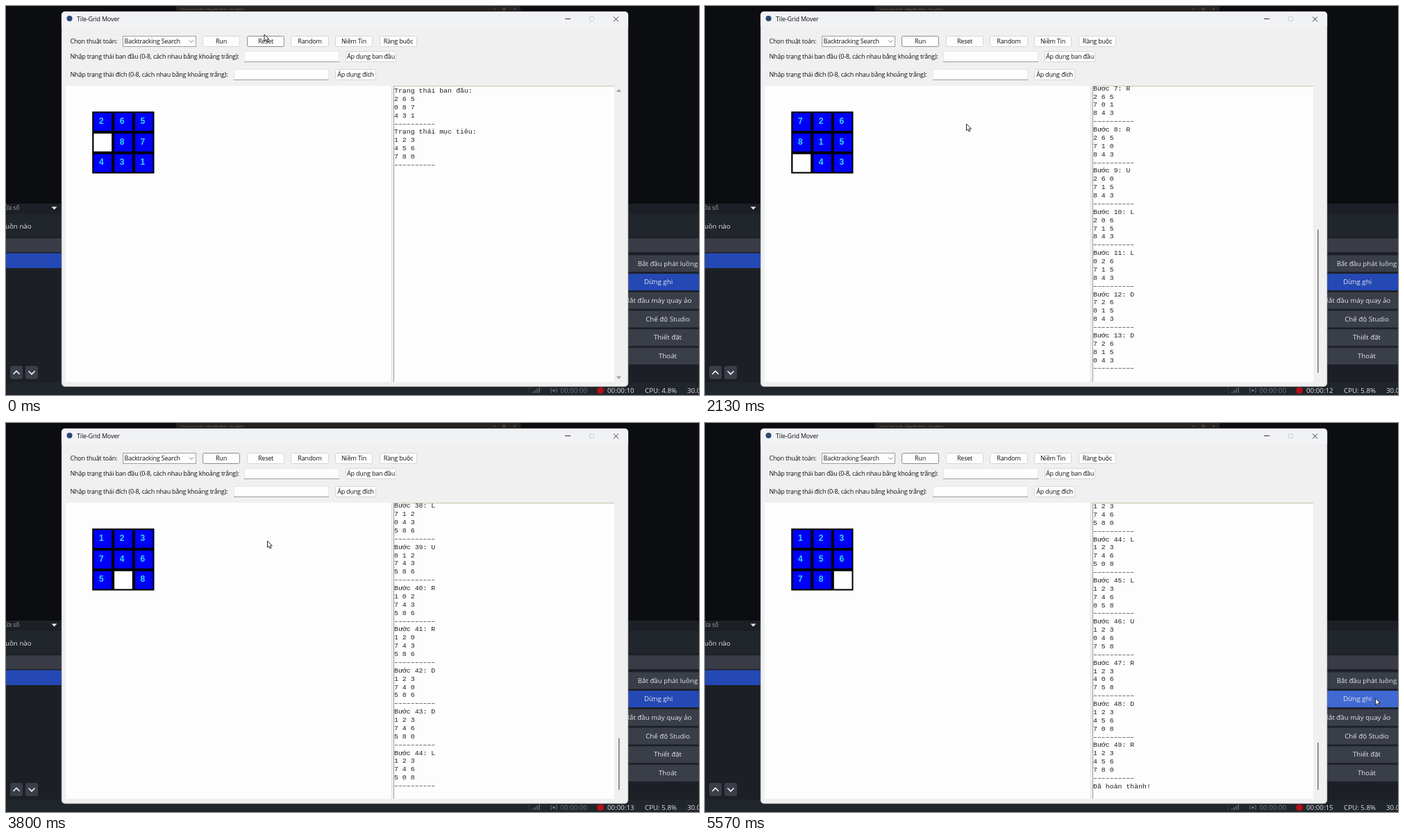
These frames come from a looping animation (998x561 px, 5.61 s). An HTML page:

```html
<!DOCTYPE html>
<html lang="vi">
<head>
<meta charset="utf-8">
<title>Sliding tiles</title>
<style>
  html, body { margin: 0; width: 100%; height: 100%; overflow: hidden; background: #0c0d10; }
  #stage { position: relative; width: 998px; height: 561px; overflow: hidden; }
  svg { position: absolute; left: 0; top: 0; }
  text { font-family: "Open Sans", "Noto Sans", sans-serif; }
  .ui text { font-size: 9px; letter-spacing: -.19px; fill: #111; }
  .dock text { font-size: 9.75px; fill: #e4e5e8; }
  .dock .dim { fill: #70747d; }
  .mid { text-anchor: middle; }
  .btn { fill: #fdfdfd; stroke: #d6d6d6; }
  .btn.focus { stroke: #8c8c96; }
  .btn.hover { fill: #deeffa; stroke: #2f86c8; }
  .key { fill: #3a3e49; }
  .key.main { fill: #2549b4; }
  .key.main.hover { fill: #4069d2; }
  #board text { font: bold 12px "Liberation Sans", Arial, sans-serif; fill: #32dcf2; text-anchor: middle; }
  #log { position: absolute; left: 559px; top: 116px; width: 317px; height: 426px; overflow: hidden; }
  #log pre { position: absolute; left: 0; top: 1px; margin: 0; color: #222;
    font: 9.9px/11.87px "Liberation Mono", "Courier New", monospace; }
</style>
</head>
<body>
<div id="stage">
  <svg width="998" height="561">
    <g class="dock">
      <rect width="998" height="286" fill="#0c0d10"/>
      <rect x="245" width="496" height="7" fill="#25221f"/>
      <text x="252" y="5.500" style="font-size:4px;fill:#77736d">Cửa sổ xem trước - bảng điều khiển - thử nghiệm</text>
      <path d="M702 4.500h3M716 3h3v3h-3zM731 3l3 3m0-3l-3 3" stroke="#77736d" stroke-width=".6" fill="none"/>
      <rect y="285" width="998" height="276" fill="#1c2026"/>
      <rect y="300" width="998" height="33" fill="#21252c"/>
      <rect y="335" width="998" height="20" fill="#393c46"/>
      <rect y="356.500" width="80" height="21.500" fill="#2549b4"/>
      <rect y="543" width="998" height="18" fill="#21252c"/>
      <text x="-2" y="294" style="fill:#a0a2a8;font-size:8.300px">ửa sổ</text>
      <path d="M65.500 289.500h8l-4 4.200z" fill="#e4e5e8"/>
      <text x="-1" y="320.500">uồn nào</text>
      <rect class="key" x="6" y="519" width="18" height="19" rx="3"/>
      <rect class="key" x="28" y="519" width="18" height="19" rx="3"/>
      <path d="M10.500 531l4.500-4.500 4.500 4.500M32.500 526.500l4.500 4.500 4.500-4.500" fill="none" stroke="#f4f4f4" stroke-width="1.600"/>
      <g id="keys"></g>
      <path d="M753.500 547v12" stroke="#353840"/>
      <path d="M759 558v-2m3 2v-4m3 4v-6m3 6v-8" stroke="#555961" stroke-width="2"/>
      <circle cx="789" cy="554.500" r="1.800" fill="#70747d"/>
      <path d="M785.500 551q-2 3.500 0 7m7-7q2 3.500 0 7" fill="none" stroke="#70747d"/>
      <text x="798.500" y="558" class="dim">00:00:00</text>
      <circle cx="856" cy="554.500" r="4.800" fill="#b80f16"/>
      <text id="clock" x="866" y="558"></text>
      <text id="cpu" x="920" y="558"></text>
      <text x="981" y="558">30.00</text>
    </g>

    <g class="ui">
      <rect x="80" y="8" width="816" height="541" rx="5" fill="#f0f0f0" stroke="#7c7c80" stroke-opacity=".6"/>
      <path d="M80 30V13a5 5 0 0 1 5-5h806a5 5 0 0 1 5 5v17z" fill="#f1f2f5"/>
      <circle cx="91.500" cy="18" r="4" fill="#2b4672"/>
      <text x="102" y="22">Tile-Grid Mover</text>
      <path d="M805 18.500h8M875 15.500l7 7m0-7l-7 7" stroke="#333" fill="none"/>
      <rect x="840.500" y="15.500" width="6" height="6" rx="1" fill="none" stroke="#ccc"/>
      <text x="92.500" y="54">Chọn thuật toán:</text>
      <rect x="168.500" y="43.500" width="105" height="15" fill="#fdfdfd" stroke="#a0a0a0"/>
      <text x="170.500" y="54">Backtracking Search</text>
      <path d="M264 49.500l3 3 3-3" fill="none" stroke="#666" stroke-width=".9"/>
      <text x="92.500" y="76">Nhập trạng thái ban đầu (0-8, cách nhau bằng khoảng trắng):</text>
      <text x="92.500" y="102">Nhập trạng thái đích (0-8, cách nhau bằng khoảng trắng):</text>
      <g fill="#fdfdfd" stroke="#e6e6e6">
        <rect x="343.500" y="65.500" width="136" height="15"/>
        <rect x="328.500" y="91.500" width="136" height="15"/>
      </g>
      <path d="M343 80.500h137M328 106.500h137" stroke="#9a9aa4"/>
      <g id="buttons"></g>
      <rect x="86" y="115" width="469" height="427" fill="#fdfdfd"/>
      <rect x="558" y="115.500" width="318" height="426.500" fill="#fdfdfd"/>
      <path d="M555.500 115v427" stroke="#dedee2"/>
      <path d="M558.500 542V115.500" stroke="#9a9bb0"/>
      <path d="M558 115.500H876" stroke="#c5c3ae"/>
      <path id="arrows" d="M879 124l3.500-4.500 3.500 4.500zM879 534l3.500 4.500 3.500-4.500z" fill="#a4a4a4"/>
      <rect id="thumb" x="882" width="1.600" rx=".8" fill="#77777c"/>
    </g>

    <rect x="124.200" y="152.200" width="89.300" height="89.300"/>
    <g id="board"></g>
  </svg>
  <div id="log"><pre></pre></div>
  <svg width="998" height="561">
    <path id="cursor" d="M0 0v9.500l2.200-1.900 1.500 3.400 1.700-.8-1.500-3.200h3z" fill="#fff" stroke="#111" stroke-width=".9"/>
  </svg>
</div>

<script>
const LOOP = 5610, RUN_AT = 1410, STEP = 53.7, LINE = 11.87;
const CLICK = 950, TICK = 950;
const MOVES = 'RRD' + 'LLURRULLDDRUR' + 'ULDRDLU' + 'URDDLU' + 'RULDLDR' + 'ULURRDD' + 'LLURDR';
const SHIFT = { U: -3, D: 3, L: -1, R: 1 };
const PATH = [[0, 372, 41], [150, 372, 41], [520, 334.5, 55], [1000, 334.5, 55],
  [1350, 376.5, 170], [4650, 376.5, 170], [5430, 965.5, 397], [LOOP, 965.5, 397]];

const $ = id => document.getElementById(id);

function add(parent, tag, attrs, text = '') {
  const el = document.createElementNS('http://www.w3.org/2000/svg', tag);
  for (const k in attrs) el.setAttribute(k, attrs[k]);
  el.textContent = text;
  return parent.appendChild(el);
}

function button(label, x, y, w) {
  const box = add($('buttons'), 'rect', { class: 'btn', x: x + .5, y: y + .5, width: w - 1, height: 15, rx: 2 });
  add($('buttons'), 'text', { class: 'mid', x: x + w / 2, y: y + 11 }, label);
  return box;
}
const run = button('Run', 283, 43, 54);
const reset = button('Reset', 347, 43, 54);
button('Random', 410, 43, 55);
button('Niềm Tin', 474, 43, 54);
button('Ràng buộc', 538, 43, 54);
button('Áp dụng ban đầu', 489, 65, 73);
button('Áp dụng đích', 474, 91, 59);

const keys = [['Bắt đầu phát luồng', 953], ['Dừng ghi', 939.5], ['Bắt đầu máy quay ảo', 939.5],
  ['Chế độ Studio', 953], ['Thiết đặt', 953], ['Thoát', 953]].map(([label, x], i) => {
  const y = 359.4 + i * 26.7;
  const box = add($('keys'), 'rect', { class: i == 1 ? 'key main' : 'key', x: 890, y, width: 108, height: 24 });
  add($('keys'), 'text', { class: 'mid', x, y: y + 15.2 }, label);
  return box;
});

const tiles = Array.from({ length: 9 }, (_, i) => {
  const x = i % 3 * 29.7, y = Math.floor(i / 3) * 29.7;
  return {
    box: add($('board'), 'rect', { x: 126.4 + x, y: 154.3 + y, width: 25.7, height: 25.7 }),
    num: add($('board'), 'text', { x: 137.4 + x, y: 169.8 + y })
  };
});

// Every board from the start to the solution
const boards = ['265087431'];
for (const m of MOVES) {
  const b = [...boards.at(-1)], from = b.indexOf('0'), to = from + SHIFT[m];
  [b[from], b[to]] = [b[to], b[from]];
  boards.push(b.join(''));
}

// En dashes give the rule its nearly closed line
const block = (title, b) =>
  [title, ...b.match(/.../g).map(r => [...r].join(' ')), '–'.repeat(10)];
const first = block('Trạng thái ban đầu:', boards[0]);
const idle = [...first, ...block('Trạng thái mục tiêu:', '123456780')];
const solved = [...first,
  ...boards.slice(1).flatMap((b, i) => block(`Bước ${i + 1}: ${MOVES[i]}`, b)), 'Đã hoàn thành!'];

function cursorAt(t) {
  const i = PATH.findIndex(p => p[0] > t), [t0, x0, y0] = PATH[i - 1], [t1, x1, y1] = PATH[i];
  const u = (t - t0) / (t1 - t0), e = u * u * (3 - 2 * u);
  return [x0 + (x1 - x0) * e, y0 + (y1 - y0) * e];
}

const pre = document.querySelector('#log pre');
let shown;

function showStep(step) {
  if (step === shown) return;
  shown = step;
  const lines = step < 0 ? idle : solved.slice(0, 5 * (step + 1));
  const scroll = Math.max(0, lines.length * LINE - 412);
  pre.textContent = lines.join('\n');
  pre.style.transform = `translateY(${-scroll}px)`;

  const length = Math.min(399, 380 * 36 / (lines.length + 1) + 14);
  $('thumb').setAttribute('y', 529 - length);
  $('thumb').setAttribute('height', length);
  $('thumb').style.display = scroll ? '' : 'none';
  $('arrows').style.display = scroll ? 'none' : '';

  const board = boards[Math.min(Math.max(step, 0), MOVES.length)];
  tiles.forEach(({ box, num }, i) => {
    box.setAttribute('fill', board[i] == '0' ? '#fff' : '#0000fa');
    num.textContent = board[i] == '0' ? '' : board[i];
  });
}

function draw(now) {
  const t = now % LOOP;
  showStep(Math.max(-1, Math.min(50, Math.floor((t - RUN_AT) / STEP))));

  const [x, y] = cursorAt(t);
  $('cursor').setAttribute('transform', `translate(${x} ${y})`);
  run.classList.toggle('hover', x > 283 && x < 337 && y > 43 && y < 59);
  run.classList.toggle('focus', t >= CLICK);
  reset.classList.toggle('focus', t < CLICK);
  keys[1].classList.toggle('hover', x > 897 && y > 386 && y < 410);

  $('clock').textContent = '00:00:' + (10 + Math.max(0, Math.floor((t - TICK) / 1000) + 1));
  $('cpu').textContent = `CPU: ${t < TICK ? '4.8' : '5.8'}%`;
  requestAnimationFrame(draw);
}
draw(performance.now());
</script>
</body>
</html>
```
